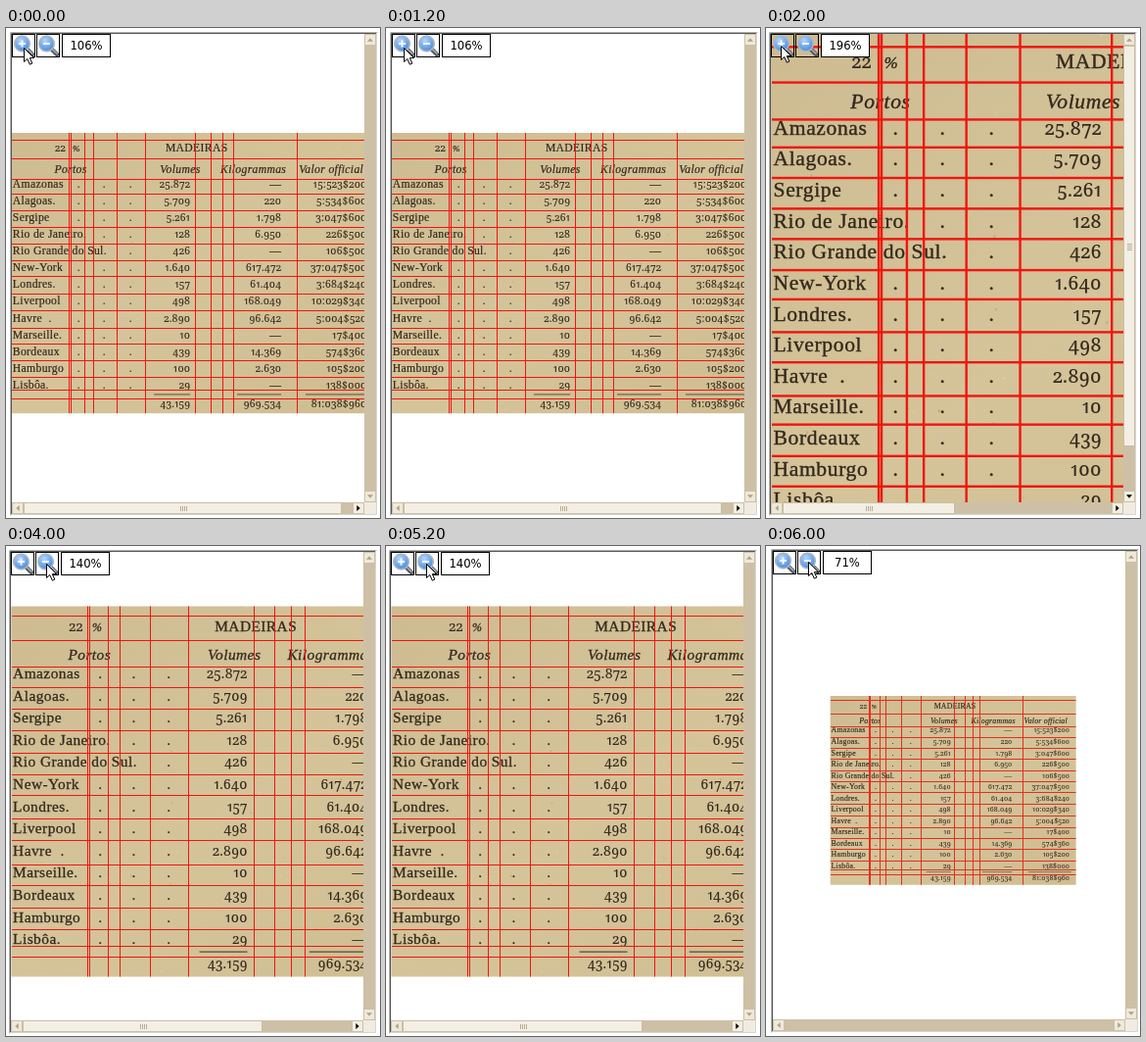
An HTML page for the animation above (8 s loop, 382 px wide and 500 px high).

```html
<!DOCTYPE html>
<html lang="en">
<head>
<meta charset="utf-8">
<title>Table viewer zoom</title>
<style>
html, body { margin: 0; width: 100%; height: 100%; overflow: hidden; background: #fff; }
svg { display: block; width: 100%; height: 100%; }
.scene { visibility: hidden; animation: show 8s step-end infinite; }
@keyframes show {
  0% { visibility: visible; }
  25%, 100% { visibility: hidden; }
}
.ink { fill: #33291c; stroke: #33291c; stroke-width: .2; font: 11px "Liberation Serif", serif; letter-spacing: .32px; white-space: pre; }
.it { font-style: italic; }
.num { font: 10px "Noto Serif", serif; font-variant-numeric: oldstyle-nums proportional-nums; letter-spacing: .25px; stroke-width: .05; }
.end { text-anchor: end; }
.small { font-size: 8.5px; }
.zoom { font: 11.6px "DejaVu Sans", sans-serif; text-anchor: middle; }
</style>
</head>
<body>
<svg id="stage" viewBox="0 0 382 500" xmlns="http://www.w3.org/2000/svg">
  <defs>
    <linearGradient id="paper" x1="0" y1="0" x2="1" y2="1">
      <stop offset="0" stop-color="#cebb91"/>
      <stop offset=".5" stop-color="#d5c49a"/>
      <stop offset="1" stop-color="#cfbc91"/>
    </linearGradient>
    <radialGradient id="lens" cx=".4" cy=".3" r=".75">
      <stop offset="0" stop-color="#b5d6fa"/>
      <stop offset=".6" stop-color="#6ea6ea"/>
      <stop offset="1" stop-color="#4a82d0"/>
    </radialGradient>
    <g id="glass">
      <path d="M15.5 15.5L21 21" stroke="#50565e" stroke-width="4.4" stroke-linecap="round"/>
      <path d="M16 15.4L21 20.2" stroke="#a3a9b0" stroke-width="1.6" stroke-linecap="round"/>
      <circle cx="10.5" cy="10" r="7.8" fill="url(#lens)" stroke="#a9b7c9" stroke-width="1.7"/>
    </g>
    <path id="pointer" d="M.5 .5V14.5L3.8 11.5L6.3 17.2L8.8 16.1L6.3 10.6H10.6Z" fill="#fff" stroke="#000"/>
    <g id="sheet"></g>
  </defs>
</svg>
<script>
const NS = "http://www.w3.org/2000/svg";
const stage = document.getElementById("stage");
const sheet = document.getElementById("sheet");

function add(parent, tag, attrs, text) {
  const el = document.createElementNS(NS, tag);
  for (const k in attrs) el.setAttribute(k, attrs[k]);
  if (text) el.textContent = text;
  parent.appendChild(el);
  return el;
}
const rect = (p, x, y, width, height, fill, stroke = "none") =>
  add(p, "rect", { x, y, width, height, fill, stroke });
const word = (x, y, s, cls = "") => add(sheet, "text", { x, y, class: "ink " + cls }, s);

const W = 351, H = 270;
const rows = `Amazonas|25.872|—|15:523$200
Alagoas.|5.709|220|5:534$600
Sergipe|5.261|1.798|3:047$600
Rio de Janeiro.|128|6.950|226$500
Rio Grande do Sul.|426|—|106$500
New-York|1.640|617.472|37:047$500
Londres.|157|61.404|3:684$240
Liverpool|498|168.049|10:029$340
Havre  .|2.890|96.642|5:004$520
Marseille.|10|—|17$400
Bordeaux|439|14.369|574$360
Hamburgo|100|2.630|105$200
Lisbôa.|29|—|138$000`.split("\n").map(r => r.split("|"));
const rights = [171.9, 259.7, 342];
const vLines = [55.5, 57, 70.2, 79, 101.2, 129.2, 177, 192, 203.6, 213.8, 275];
const hLines = [6.8, 25.3, 44.6, 59.1, 75, 91, 106.8, 123, 138.2, 155.3, 171, 188.5, 203.4, 219.8, 235.6, 248, 256];

function drawSheet() {
  rect(sheet, -.5, 0, W + .5, H, "url(#paper)");
  let seed = 7;
  const rnd = () => (seed = seed * 16807 % 2147483647) / 2147483647;
  for (let i = 0; i < 70; i++)
    add(sheet, "circle", { cx: rnd() * W, cy: rnd() * H, r: .3 + rnd() * .5, fill: i % 2 ? "#e3d6b0" : "#b09a6a", opacity: .5 });

  word(41.6, 18.2, "22", "num");
  word(58.6, 18.2, "%", "it small");
  word(148, 18.2, "MADEIRAS");
  [["Portos", 41], ["Volumes", 142.8], ["Kilogrammas", 201], ["Valor official", 276.6]]
    .forEach(([s, x]) => word(x, 38.8, s, "it"));

  const cells = (vals, y) => vals.forEach((s, i) =>
    word(rights[i], y, s, s === "—" ? "end" : "num end"));
  rows.forEach(([name, ...vals], i) => {
    const y = 52.5 + 16.15 * i;
    word(.8, y, name);
    const skip = i === 4 ? 2 : i === 3 ? 1 : 0;
    [63, 87.5, 113].slice(skip).forEach(x => word(x, y, "."));
    cells(vals, y);
  });
  [[136.8, 35], [217, 42.5], [283, 61]].forEach(([x, w]) => rect(sheet, x, 251.5, w, .7, "#33291c"));
  cells(["43.159", "969.534", "81:038$960"], 264);
}

// ruled lines snap to whole pixels unless the sheet is enlarged strongly
function drawLines(g, s) {
  const big = s.k > 1.5, t = big ? 2.4 : 1;
  const color = s.k < 1 ? "#e2301f" : "#ee1610";
  const at = v => big ? v - t / 2 + .3 : Math.round(v - .5);
  hLines.forEach(y => rect(g, s.x, at(s.y + y * s.k), W * s.k, t, color));
  vLines.forEach(x => rect(g, at(s.x + x * s.k), s.y, t, H * s.k, color));
}

// dir is the arrow's turn in degrees, 0 = up
function arrowButton(g, x, y, dir, on) {
  rect(g, x + .5, y + .5, 11, 11, on ? "#f3eee2" : "#efe9da", "#cbbfa6");
  add(g, "path", { d: "M-3 1.7L0 -1.7L3 1.7Z", fill: on ? "#000" : "#b0a286",
    transform: `translate(${x + 6} ${y + 6}) rotate(${dir})` });
}

function thumb(g, x, y, w, h) {
  rect(g, x + .5, y + .5, w - 1, h - 1, "#f3efe5", "#c9bea6");
  const wide = w > h, cx = Math.round(x + w / 2), cy = Math.round(y + h / 2);
  for (let i = -3; i <= 3; i += 2)
    wide ? rect(g, cx + i, cy - 2, 1, 5, "#b9ad94") : rect(g, cx - 2, cy + i, 5, 1, "#b9ad94");
}

function drawBars(g, s) {
  rect(g, 366, 6, 12, 478, "#cdc0a6");
  rect(g, 6, 484, 360, 12, "#cdc0a6");
  rect(g, 366, 484, 12, 12, "#f0ece2");
  arrowButton(g, 366, 6, 0, false);
  arrowButton(g, 366, 472, 180, !!s.vThumb);
  arrowButton(g, 6, 484, 270, false);
  arrowButton(g, 354, 484, 90, !!s.hThumb);
  if (s.vThumb) thumb(g, 366, 18, 12, s.vThumb);
  if (s.hThumb) thumb(g, 18, 484, s.hThumb, 12);
}

function drawTools(g, s) {
  [6, 31].forEach((x, i) => {
    add(g, "use", { href: "#glass", x, y: 6 });
    rect(g, x + 7, 15, 7, 2, "#f4f9ff");
    if (!i) rect(g, x + 9.5, 12.5, 2, 7, "#f4f9ff");
    rect(g, x + .5, 6.5, 23, 23, "none", "#000");
  });
  rect(g, 57.5, 6.5, 49, 23, "#fff", "#000");
  add(g, "text", { x: 82, y: 22, class: "zoom" }, s.label);
}

function drawScene(s, i) {
  const scene = add(stage, "g", { class: "scene", style: `animation-delay:${i * 2 - 8}s` });
  const clip = add(stage.querySelector("defs"), "clipPath", { id: "view" + i });
  rect(clip, 6 + s.dx, 6 + s.dy, 360, 478, "#000");

  const page = add(scene, "g", { "clip-path": `url(#view${i})` });
  add(page, "use", { href: "#sheet", transform: `translate(${s.x} ${s.y}) scale(${s.k})` });
  drawLines(page, s);

  const ui = add(scene, "g", { transform: `translate(${s.dx} ${s.dy})` });
  add(ui, "path", { d: "M4.5 497.5V4.5H379.5", fill: "none", stroke: "#b4b4b4" });
  add(ui, "path", { d: "M5.5 496.5V5.5H378.5", fill: "none", stroke: "#555" });
  add(ui, "path", { d: "M5 496.5H378.5V5", fill: "none", stroke: "#d9d5cc" });
  drawBars(ui, s);
  drawTools(ui, s);
  add(scene, "use", { href: "#pointer", x: s.px, y: s.py });
}

drawSheet();
[
  { k: 1.06, x: 6, y: 107, dx: 0, dy: 0, label: "106%", px: 18, py: 20, hThumb: 325 },
  { k: 1.96, x: 6, y: 5.7, dx: -1, dy: 0, label: "196%", px: 15, py: 18, hThumb: 176, vThumb: 409 },
  { k: 1.4, x: 6, y: 61.5, dx: -1, dy: 0, label: "140%", px: 41, py: 18, hThumb: 245 },
  { k: .714, x: 66, y: 153, dx: 1, dy: -1, label: "71%", px: 43, py: 16 }
].forEach(drawScene);
</script>
</body>
</html>
```
